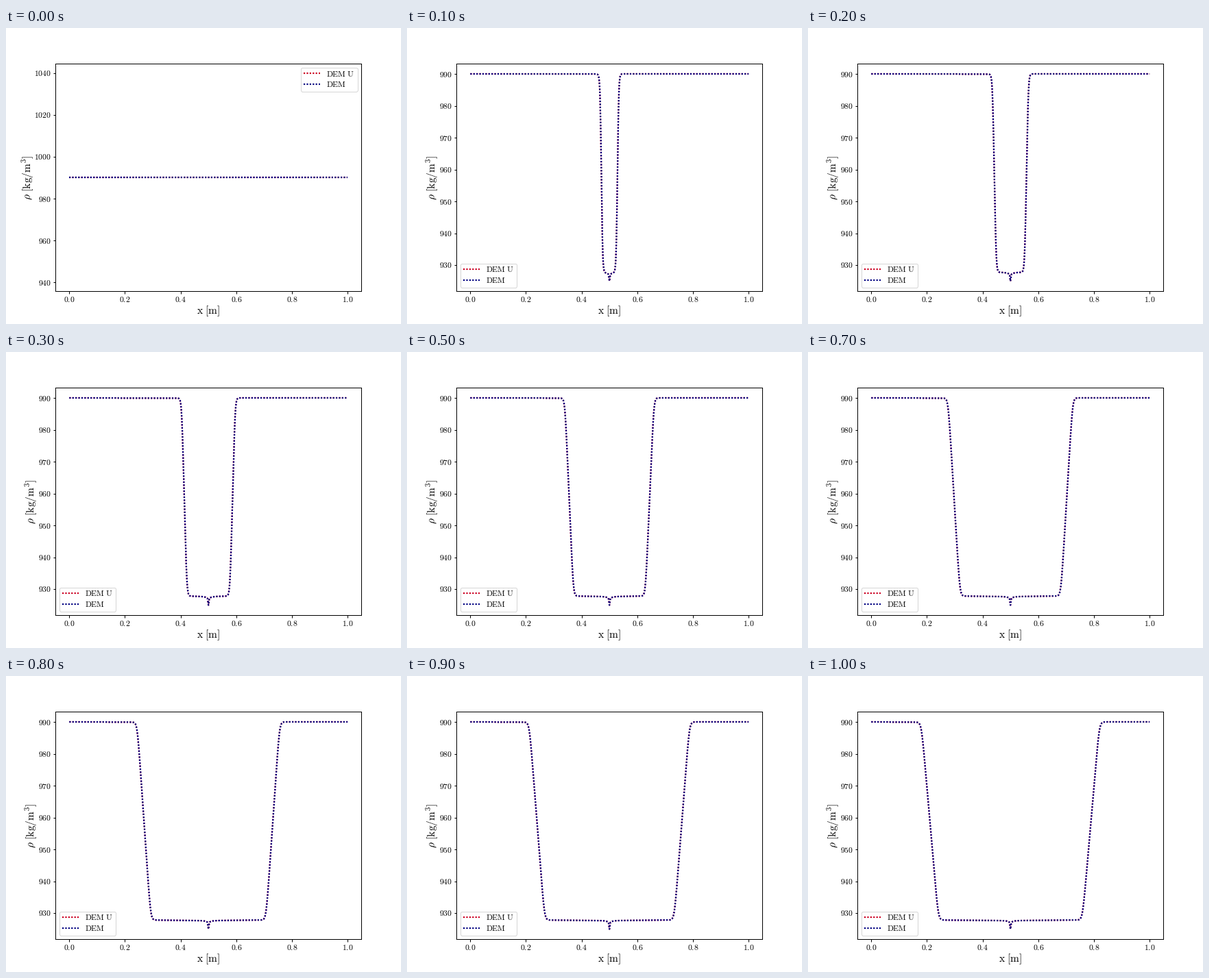
A matplotlib script that plays this animation: 576 by 432 pixels, repeating every 1100 ms.

```python
import numpy as np
import matplotlib.pyplot as plt
from matplotlib.animation import FuncAnimation

plt.rcParams.update({
    "font.family": "Liberation Serif",
    "font.size": 11.7,
    "mathtext.fontset": "cm",
    "axes.linewidth": 1,
    "xtick.major.width": 1,
    "ytick.major.width": 1,
    "xtick.major.pad": 3,
    "ytick.major.pad": 2.5,
    "legend.borderpad": 0.33,
    "legend.labelspacing": 0.28,
    "legend.handlelength": 2.05,
})

FRAMES, STEP_MS = 11, 100
RHO0, RHO_MIN = 990.1, 924.95
RED, NAVY = "#cc0022", "#000080"
DOTS = dict(linestyle=(0, (1, 1)), lw=2.2)

x = np.linspace(0, 1, 1001)


def roman(text):
    return r"$\mathrm{" + text.replace(" ", r"\ ") + "}$"


def softplus(d, w):
    return w * np.logaddexp(0, d / w)


def density(k, lag=0.0):
    """Two rarefaction fans leaving the centre, k steps after release."""
    if k == 0:
        return np.full_like(x, RHO0)
    d = np.abs(x - 0.5 + lag)
    tail, head = 0.0259 * k, 0.032 * k
    w = 0.0019 + 0.00018 * k
    rise = (softplus(d - tail, w) - softplus(d - head, w)) / (head - tail)
    floor = 927.6 + 0.2 * np.clip(d / tail, 0, 1) * min(1, k / 3)
    rho = floor + (RHO0 - floor) * rise

    # narrow cusp at the centre
    c = np.abs(x - 0.5)
    cusp = 0.3 * np.exp(-c / 0.008) + 0.7 * np.clip(1 - c / 0.0035, 0, 1)
    rho -= (rho.min() - RHO_MIN) * cusp * (1 - rise)

    # weak pressure wave ahead of the left fan
    edge = np.interp(k, [1, 3, 5, 9, 10], [0.45, 0.172, 0.258, 0.085, 0.063])
    rho -= 0.07 * rise * (x < 0.5) / (1 + np.exp(-(x - edge) / 0.004))
    return rho


fig, ax = plt.subplots(figsize=(8, 6), dpi=72)
red, = ax.plot(x, density(0), color=RED, label=roman("DEM U"), **DOTS)
navy, = ax.plot(x, density(0), color=NAVY, label=roman("DEM"), **DOTS)
ax.set_xlabel(roman("x [m]"), fontsize=15.5, labelpad=0.5)
ax.set_ylabel(r"$\rho\ \mathrm{[kg/m^3]}$", fontsize=15.5, labelpad=-1.5)
ax.set_xlim(-0.05, 1.05)
ax.xaxis.set_major_formatter(lambda v, _: roman(f"{v:.1f}"))
ax.yaxis.set_major_formatter(lambda v, _: roman(f"{v:.0f}"))


def draw(k):
    red.set_ydata(density(k, 0.0003))
    navy.set_ydata(density(k))
    if k == 0:
        low, high = 0.95 * RHO0, 1.05 * RHO0
        ticks, loc = np.arange(940, 1041, 20), "upper right"
    else:
        low, high = RHO_MIN, RHO0
        ticks, loc = np.arange(930, 991, 10), "lower left"
    pad = 0.05 * (high - low)
    ax.set_ylim(low - pad, high + pad)
    ax.set_yticks(ticks)
    ax.legend(loc=loc)
    return red, navy


anim = FuncAnimation(fig, draw, frames=FRAMES, interval=STEP_MS,
                     init_func=lambda: draw(0), repeat=True, repeat_delay=0)
plt.show()
```
